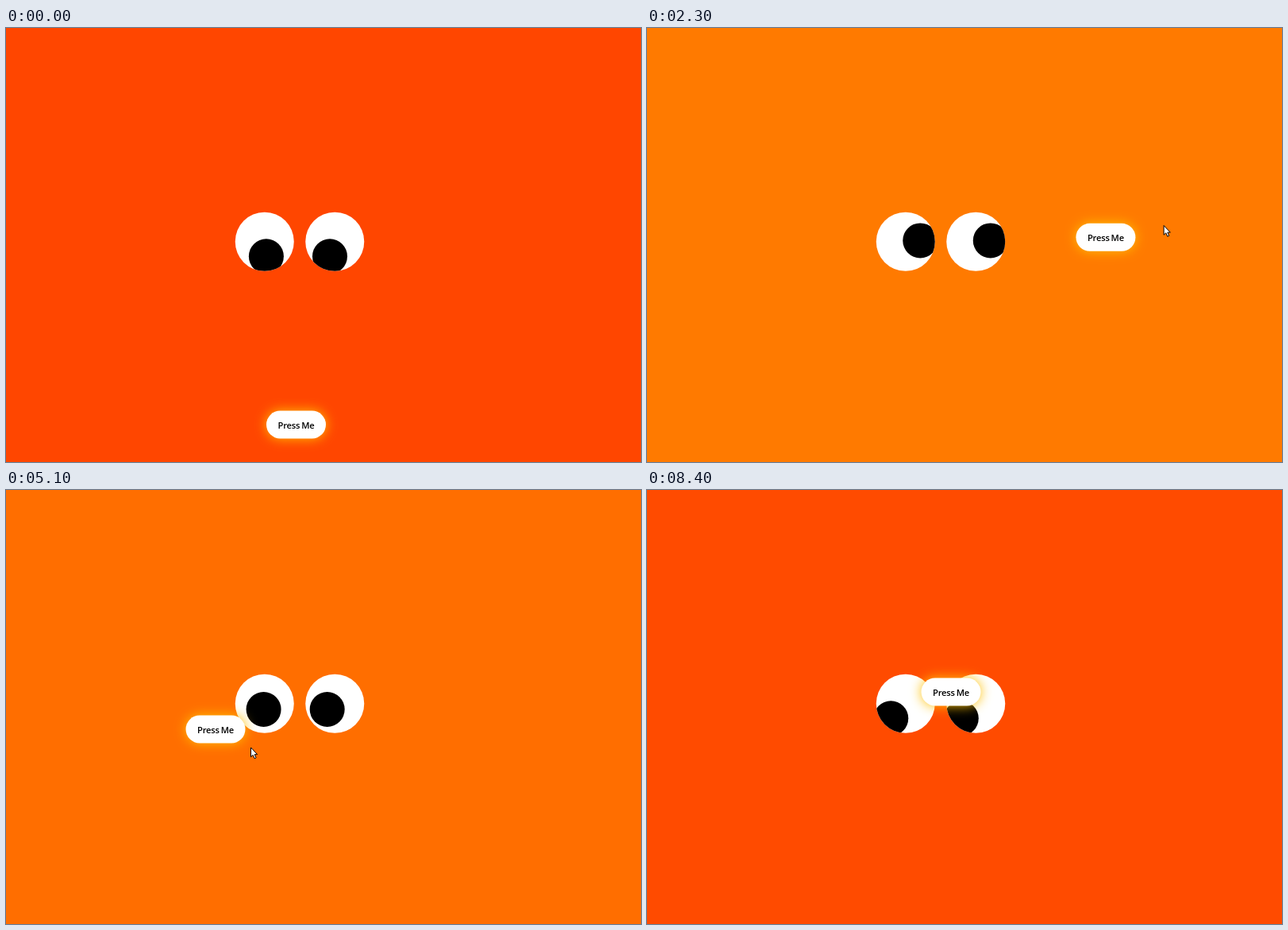
Animation of 800 by 546 pixels, one loop 8.5 s. Source, as an HTML page:

```html
<!DOCTYPE html>
<html lang="en">
<head>
<meta charset="utf-8">
<title>Press Me</title>
<style>
  html, body { margin: 0; width: 100%; height: 100%; overflow: hidden; }
  #stage { position: relative; width: 800px; height: 546px; overflow: hidden; background: #ff4500; }
  #stage > * { position: absolute; left: 0; top: 0; }
  .eye { width: 73.5px; height: 73.5px; border-radius: 50%; background: #fff; overflow: hidden; }
  .pupil { position: absolute; left: 14.75px; top: 14.75px; width: 44px; height: 44px; border-radius: 50%; background: #000; }
  #button {
    width: 75px; height: 35px; border-radius: 18px; background: #fff; color: #000;
    box-shadow: 0 0 15px #ffc000;
    font: 600 16.5px/35px "Open Sans", sans-serif; font-stretch: 62.5%;
    letter-spacing: -.02em; word-spacing: -.06em; text-align: center; white-space: nowrap;
  }
  #cursor { overflow: visible; }
</style>
</head>
<body>
<div id="stage">
  <div class="eye"><div class="pupil"></div></div>
  <div class="eye"><div class="pupil"></div></div>
  <div id="button"><span>Press Me</span></div>
  <svg id="cursor" width="10" height="16">
    <path d="M0 0V11.8L2.7 9.4L4.6 13.8L6.6 12.9L4.7 8.7H8.2Z" fill="#fff" stroke="#000"/>
  </svg>
</div>
<script>
const LOOP = 8500, STEP = 100;
const EYES = [[325.5, 268.5], [414, 268.5]];
const LAG = 60, FOLLOW = .095, REACH = 18.5;

// Key poses of the chase: time, mouse x and y, button x and y
const CHASE = [
  [0, 348, 560, 365.5, 499],
  [900, 518, 398, 483.5, 341],
  [1300, 539, 368, 483.5, 341],
  [2750, 676, 222, 606, 220],
  [3400, 535.5, 220, 496.7, 178],
  [4100, 390, 165, 322, 130],
  [4600, 250, 190, 170, 172],
  [4980, 318, 366, 215, 280],
  [5100, 308.5, 324, 264, 301],
  [5750, 318, 344, 330, 282],
  [6000, 367, 345.5, 369.3, 275.5],
  [6700, 189, 150, 326, 150],
  [6900, 260.5, 116, 319.6, 139],
  [7500, 325, 224, 383, 254],
  [8200, 98, 566, 383, 254]
];

const clamp = (v, lo, hi) => Math.max(lo, Math.min(hi, v));

// Speed at a key: harmonic mean of both sides, zero where the path turns
function speed(n, k) {
  const [p, c, q] = [CHASE[n - 1], CHASE[n], CHASE[n + 1]];
  if (!p || !q) return 0;
  const before = (c[k] - p[k]) / (c[0] - p[0]), after = (q[k] - c[k]) / (q[0] - c[0]);
  return before * after > 0 ? 2 * before * after / (before + after) : 0;
}

// Smooth Hermite curve through the keys
function pose(time) {
  const t = clamp(time, 0, CHASE[CHASE.length - 1][0]);
  const i = Math.max(1, CHASE.findIndex(key => key[0] >= t)) - 1;
  const a = CHASE[i], b = CHASE[i + 1], span = b[0] - a[0], u = (t - a[0]) / span;
  return [1, 2, 3, 4].map(k =>
    a[k] + (b[k] - a[k]) * u * u * (3 - 2 * u) +
    span * u * (1 - u) * (speed(i, k) * (1 - u) - speed(i + 1, k) * u));
}

// cubic-bezier(.25, .1, .25, 1)
function ease(x) {
  const bezier = (s, p, q) => 3 * s * (1 - s) ** 2 * p + 3 * s * s * (1 - s) * q + s ** 3;
  let lo = 0, hi = 1;
  for (let n = 0; n < 24; n++) {
    const mid = (lo + hi) / 2;
    if (bezier(mid, .25, .25) < x) lo = mid; else hi = mid;
  }
  return bezier(lo, .1, 1);
}

// Orange to orangered and back, two seconds each way
function background(t) {
  const phase = (t - 1765 + 4000) % 4000;
  const away = Math.min(phase, 4000 - phase) / 2000;
  return `rgb(255,${Math.round(165 - 96 * ease(away))},0)`;
}

const stage = document.getElementById("stage");
const button = document.getElementById("button");
const cursor = document.getElementById("cursor");
const pupils = document.querySelectorAll(".pupil");
const move = (el, x, y) => { el.style.transform = `translate(${x}px,${y}px)`; };

// Use the narrowest label face, sized to sit inside the pill
function fitLabel() {
  const widthIn = family => {
    button.style.fontFamily = `"${family}", sans-serif`;
    return button.firstChild.getBoundingClientRect().width;
  };
  const [width, family] = ["Open Sans", "Noto Sans"]
    .map(name => [widthIn(name), name]).sort((a, b) => a[0] - b[0])[0];
  button.style.fontFamily = `"${family}", sans-serif`;
  button.style.fontSize = Math.min(16.5, 16.5 * 46 / width) + "px";
}

function draw(t) {
  const [mx, my, bx, by] = pose(t);
  const seen = pose(t - LAG);
  stage.style.background = background(t);
  move(cursor, mx, my);
  move(button, bx - 37.5, by - 17.5);
  pupils.forEach((pupil, i) => {
    const [dx, dy] = EYES[i].map((c, k) => clamp((seen[k] - c) * FOLLOW, -REACH, REACH));
    move(pupil, dx, dy);
  });
}

document.querySelectorAll(".eye").forEach((eye, i) => move(eye, EYES[i][0] - 36.75, EYES[i][1] - 36.75));
fitLabel();

const start = performance.now();
function tick() {
  const t = (performance.now() - start) % LOOP;
  draw(Math.floor(t / STEP) * STEP);
  requestAnimationFrame(tick);
}
draw(0);
requestAnimationFrame(tick);
</script>
</body>
</html>
```
